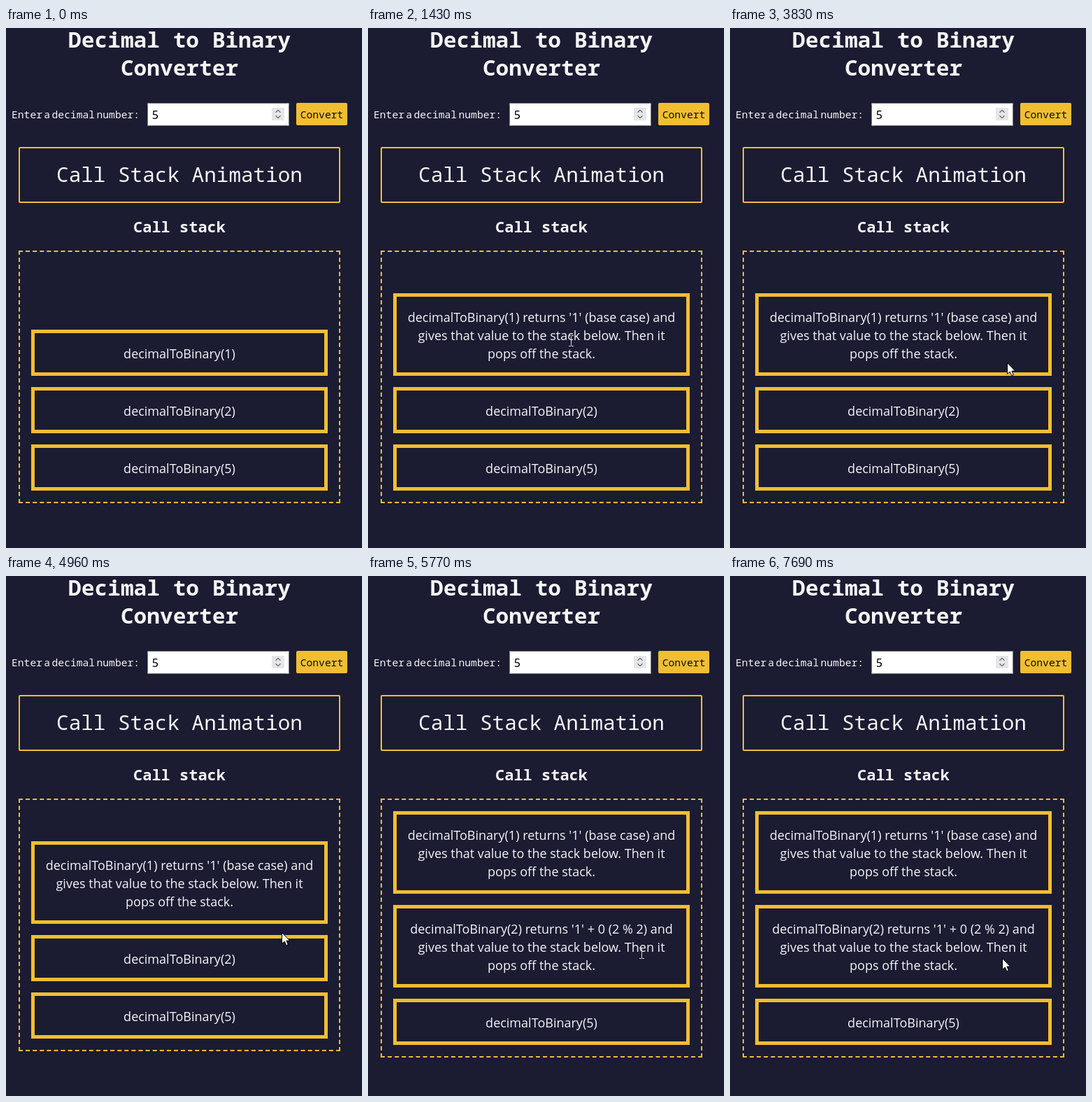
Animation of 509 by 743 pixels, one loop 8 s. Source, as an HTML page with a canvas:

```html
<!DOCTYPE html>
<html lang="en">
<head>
<meta charset="utf-8">
<title>Decimal to Binary Converter</title>
<style>
  html, body { margin: 0; width: 100%; height: 100%; overflow: hidden; background: #1b1b32; }
  canvas { display: block; width: 509px; height: 743px; }
</style>
</head>
<body>
<canvas id="stage" width="509" height="743"></canvas>
<script>
const ctx = document.getElementById('stage').getContext('2d');
const LOOP = 8000, STEP = 66.5;
const NAVY = '#1b1b32', GOLD = '#f1be32', PALE = '#f5f6f7';
const MONO = '"Noto Sans Mono", "DejaVu Sans Mono", monospace';
const SANS = '"Open Sans", "Noto Sans", sans-serif';
const CENTER = 248, LINE = 26, PAD = 20, GAP = 16;

const call = n => [`decimalToBinary(${n})`];
const returned = (n, value) => [
  `decimalToBinary(${n}) returns ${value} and`,
  'gives that value to the stack below. Then it',
  'pops off the stack.'
];

// Pointer moves: start, end, from x, y, to x, y, eased out or not.
const moves = [
  [640, 900, 473, 716, 250, 441, true],
  [1430, 1700, 288, 446, 394, 475, true],
  [2100, 2100, 394, 476, 394, 476],
  [2300, 2300, 396, 477, 396, 477],
  [3830, 3830, 396, 478, 396, 478],
  [3970, 3970, 396, 479, 396, 479],
  [4500, 4960, 396, 481, 394, 509],
  [4960, 5300, 394, 509, 389, 534],
  [5370, 5500, 389, 535, 389, 538],
  [7420, 7690, 389, 539, 389, 546]
];

function text(str, x, y, font, color = PALE, align = 'center') {
  ctx.font = font;
  ctx.fillStyle = color;
  ctx.textAlign = align;
  ctx.fillText(str, x, y);
}

function rounded(x, y, w, h, r, color) {
  ctx.fillStyle = color;
  ctx.beginPath();
  ctx.roundRect(x, y, w, h, r);
  ctx.fill();
}

function frame(x, y, w, h, line, color = GOLD, r = 0) {
  ctx.strokeStyle = color;
  ctx.lineWidth = line;
  ctx.beginPath();
  ctx.roundRect(x + line / 2, y + line / 2, w - line, h - line, r);
  ctx.stroke();
}

// Dashes of 6px with a gap near 4px, fitted so each side ends on a full dash.
function dashedLine(x1, y1, x2, y2) {
  const length = Math.hypot(x2 - x1, y2 - y1);
  const count = Math.floor((length + 4) / 10);
  ctx.setLineDash([6, (length - count * 6) / (count - 1)]);
  ctx.beginPath();
  ctx.moveTo(x1, y1);
  ctx.lineTo(x2, y2);
  ctx.stroke();
  ctx.setLineDash([]);
}

function dashedFrame(x, y, w, h) {
  ctx.strokeStyle = GOLD;
  ctx.lineWidth = 2;
  dashedLine(x, y + 1, x + w, y + 1);
  dashedLine(x, y + h - 1, x + w, y + h - 1);
  dashedLine(x + 1, y, x + 1, y + h);
  dashedLine(x + w - 1, y, x + w - 1, y + h);
}

function chevron(x, y, dir) {
  ctx.beginPath();
  ctx.moveTo(x - 3.5, y + 1.75 * dir);
  ctx.lineTo(x, y - 1.75 * dir);
  ctx.lineTo(x + 3.5, y + 1.75 * dir);
  ctx.stroke();
}

function drawHeader() {
  const title = `bold 31.17px ${MONO}`, small = `14.67px ${MONO}`;
  text('Decimal to Binary', CENTER, 28, title);
  text('Converter', CENTER, 68, title);

  ctx.wordSpacing = '-6.4px';
  text('Enter a decimal number:', 8, 129, small, PALE, 'left');
  ctx.wordSpacing = '0px';

  rounded(202, 107, 203, 33, 2, '#fff');
  frame(202, 107, 203, 33, 1, '#767676', 2);
  text('5', 208.5, 130, `16.5px ${MONO}`, '#000', 'left');
  ctx.fillStyle = '#e5e6e9';
  ctx.fillRect(380, 114, 18, 18);
  ctx.strokeStyle = '#6a6a6a';
  ctx.lineWidth = 1.2;
  chevron(389, 119, 1);
  chevron(389, 127, -1);

  rounded(415, 107, 73, 32, 2, GOLD);
  text('Convert', 451.5, 129, small, '#0a0a14');

  frame(18, 170, 460, 80, 2, GOLD, 1);
  text('Call Stack Animation', CENTER, 220, `29.33px ${MONO}`);
  text('Call stack', CENTER, 292, `bold 22px ${MONO}`);
}

const itemHeight = lines => lines.length * LINE + 2 * PAD;

// Draws the calls upward from the bottom; returns the lines with their boxes.
function drawStack(items) {
  const content = items.reduce((sum, item) => sum + itemHeight(item) + GAP, -GAP);
  const height = Math.max(361, content + 36);
  const hits = [];
  dashedFrame(18, 318, 460, height);
  let y = 318 + height - 18;
  for (const lines of [...items].reverse()) {
    y -= itemHeight(lines);
    frame(36, y, 424, itemHeight(lines), 5);
    lines.forEach((line, i) => {
      const top = y + PAD + i * LINE;
      text(line, CENTER, top + 21, `18px ${SANS}`);
      hits.push({ top, half: ctx.measureText(line).width / 2 });
    });
    y -= GAP;
  }
  return hits;
}

function pointerAt(t) {
  const move = moves.filter(m => t >= m[0]).pop();
  if (!move) return null;
  const [start, end, x0, y0, x1, y1, eased] = move;
  const sampled = Math.floor((t - start) / STEP) * STEP;
  let p = end > start ? Math.min(1, sampled / (end - start)) : 1;
  if (p > 0.95) p = 1;
  if (eased) p *= 2 - p;
  return { x: Math.round(x0 + (x1 - x0) * p), y: Math.round(y0 + (y1 - y0) * p) };
}

function drawArrow(x, y) {
  const outline = [[0, 0], [0, 16], [3.7, 12.6], [6.3, 18.2], [8.8, 17.2], [6.4, 11.6], [11.2, 11.6]];
  ctx.beginPath();
  outline.forEach(([dx, dy]) => ctx.lineTo(x + 0.5 + dx, y + 0.5 + dy));
  ctx.closePath();
  ctx.fillStyle = '#fff';
  ctx.fill();
  ctx.strokeStyle = '#000';
  ctx.lineWidth = 1;
  ctx.stroke();
}

function drawBeam(x, y) {
  const left = x - 1, top = y - 7;
  ctx.fillStyle = '#d9d9de';
  for (const row of [top, top + 15]) {
    ctx.fillRect(left, row, 3, 1);
    ctx.fillRect(left + 4, row, 3, 1);
  }
  ctx.fillRect(left + 3, top + 1, 1, 14);
}

function draw(t) {
  ctx.fillStyle = NAVY;
  ctx.fillRect(0, 0, 509, 743);
  drawHeader();
  const hits = drawStack([
    t < 500 ? call(1) : returned(1, "'1' (base case)"),
    t < 5770 ? call(2) : returned(2, "'1' + 0 (2 % 2)"),
    call(5)
  ]);
  const pointer = pointerAt(t);
  if (!pointer) return;
  const { x, y } = pointer;
  const overText = hits.some(h => y >= h.top && y < h.top + LINE && Math.abs(x - CENTER) < h.half);
  (overText ? drawBeam : drawArrow)(x, y);
}

const began = performance.now();
function tick() {
  draw((performance.now() - began) % LOOP);
  requestAnimationFrame(tick);
}
tick();
</script>
</body>
</html>
```
